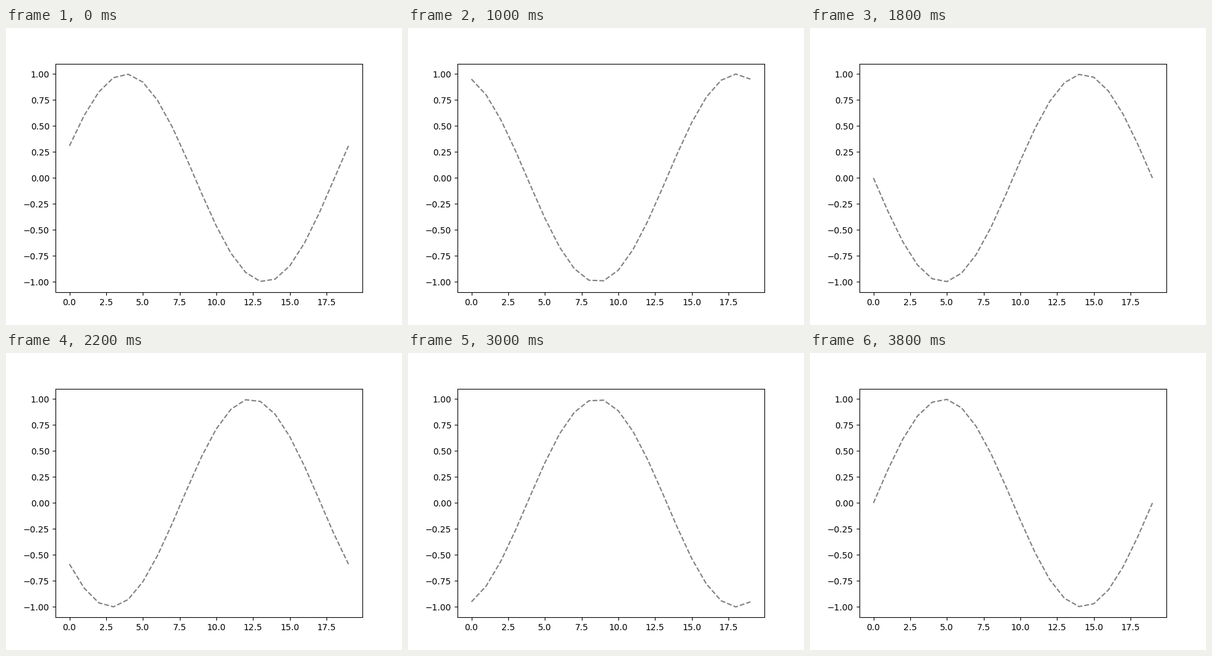
A matplotlib script for the animation above (4000 ms loop, 640 by 480 pixels).

```python
import numpy as np
import matplotlib.pyplot as plt
from matplotlib.animation import FuncAnimation

FRAMES = 20
INTERVAL = 200

x = np.arange(20)
angle = np.linspace(0, 2 * np.pi, len(x))


def wave(step):
    return np.sin(angle + 2 * np.pi * (step + 1) / FRAMES)


fig, ax = plt.subplots(figsize=(6.4, 4.8), dpi=100)
line, = ax.plot(x, wave(0), "--", color="gray", lw=1.5)
ax.set_xlim(-0.95, 19.95)
ax.set_ylim(-1.1, 1.1)


def update(step):
    line.set_ydata(wave(step))
    return line,


anim = FuncAnimation(fig, update, frames=FRAMES, interval=INTERVAL,
                     repeat=True, repeat_delay=0)
plt.show()
```
